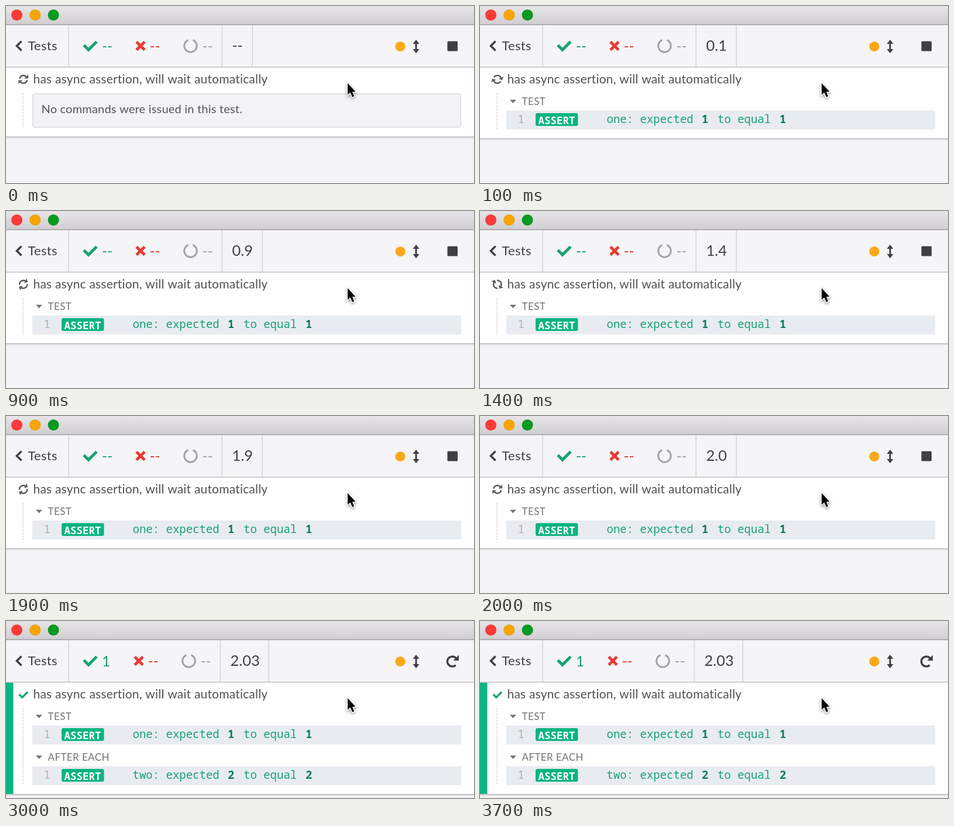
An HTML page with a canvas for the animation above (3.8 s loop, 800 by 304 pixels).

```html
<!DOCTYPE html>
<html lang="en">
<head>
<meta charset="utf-8">
<title>Test runner</title>
<style>
html, body { margin: 0; width: 100%; height: 100%; overflow: hidden; background: #f4f3f5; }
canvas { display: block; }
</style>
</head>
<body>
<canvas id="stage" width="800" height="304"></canvas>
<script>
const ctx = document.getElementById('stage').getContext('2d');
const LOOP = 3800, STEP = 100, DONE = 2100;
const SANS = 'Lato, "Open Sans", sans-serif';
const MONO = '"Noto Sans Mono", "DejaVu Sans Mono", monospace';
const GREEN = '#0bb480', TEAL = '#17a273', RED = '#e53c35', DARK = '#404044', GREY = '#a3a3a6';

function rect(x, y, w, h, color) {
  ctx.fillStyle = color;
  ctx.fillRect(x, y, w, h);
}

function box(x, y, w, h, r, fill, border) {
  ctx.beginPath();
  ctx.roundRect(x, y, w, h, r);
  ctx.fillStyle = fill;
  ctx.fill();
  if (border) {
    ctx.strokeStyle = border;
    ctx.lineWidth = 1.5;
    ctx.stroke();
  }
}

function disc(x, y, r, color) {
  ctx.beginPath();
  ctx.arc(x, y, r, 0, Math.PI * 2);
  ctx.fillStyle = color;
  ctx.fill();
}

function path(points) {
  ctx.beginPath();
  points.forEach(([x, y]) => ctx.lineTo(x, y));
}

function poly(points, color) {
  path(points);
  ctx.closePath();
  ctx.fillStyle = color;
  ctx.fill();
}

function line(points, color, width) {
  path(points);
  ctx.strokeStyle = color;
  ctx.lineWidth = width;
  ctx.stroke();
}

function arc(x, y, r, from, to, color, width) {
  const rad = Math.PI / 180;
  ctx.beginPath();
  ctx.arc(x, y, r, from * rad, to * rad);
  ctx.strokeStyle = color;
  ctx.lineWidth = width;
  ctx.stroke();
}

function text(str, x, y, size, color, spacing = 0, family = SANS, weight = 400) {
  ctx.font = `${weight} ${size}px ${family}`;
  ctx.letterSpacing = spacing + 'px';
  ctx.fillStyle = color;
  ctx.fillText(str, x, y);
}

function check(x, y, s, color) {
  line([[x, y], [x + 8 * s, y + 8 * s], [x + 22 * s, y - 6 * s]], color, 5 * s);
}

function titleBar() {
  const g = ctx.createLinearGradient(0, 0, 0, 32);
  g.addColorStop(0, '#e7e5e7');
  g.addColorStop(1, '#d0ced0');
  rect(0, 0, 800, 32, g);
  rect(0, 31, 800, 2, '#b0aeb0');
  [['#fc3a37', '#e8312f'], ['#f6a503', '#e09604'], ['#089b20', '#078a1c']].forEach(([fill, edge], i) => {
    disc(18.5 + i * 31.3, 15.5, 9.5, edge);
    disc(18.5 + i * 31.3, 15.5, 8.8, fill);
  });
}

function toolbar(done, clock) {
  const shift = done ? -3 : 0;
  rect(0, 33, 800, 71, '#f5f4f6');
  rect(0, 104, 800, 2, '#d0cfd2');
  const end = done ? 449 : clock ? 438 : 421;
  [107, 369 + shift, end].forEach(x => rect(x - 0.5, 33, 1.5, 71, '#d5d4d7'));

  line([[26.5, 60.5], [18.5, 68.5], [26.5, 76.5]], DARK, 3.6);
  text('Tests', 37.5, 76, 22, DARK, 0.3);

  check(133, 67.3, 1, TEAL);
  text(done ? '1' : '--', 164, 77.5, 24.5, TEAL);

  const x = 230 + shift;
  line([[x - 7, 61.5], [x + 7, 75.5]], RED, 5);
  line([[x + 7, 61.5], [x - 7, 75.5]], RED, 5);
  text('--', x + 15.5, 77.5, 24.5, RED);

  arc(315.5 + shift, 68.5, 10.8, -68, 248, GREY, 3);
  text('--', 335.5 + shift, 77.5, 24.5, GREY);

  text(clock || '--', 386.5 + shift, 76.5, clock ? 25.5 : 24.5, DARK);

  disc(674, 69.5, 8.6, '#fba81a');
  line([[701, 63], [701, 76]], DARK, 3);
  poly([[701, 57.7], [706.5, 65], [695.5, 65]], DARK);
  poly([[701, 81.3], [706.5, 74], [695.5, 74]], DARK);

  if (done) {
    arc(763, 69.5, 8.6, 48, 318, DARK, 3.5);
    poly([[774, 58.5], [774, 68], [764.5, 68]], DARK);
  } else {
    box(754.5, 60.5, 17.5, 17, 1.5, DARK);
  }
}

function spinner(t) {
  ctx.save();
  ctx.translate(29.7, 126);
  ctx.rotate(t / 1000 * Math.PI);
  for (let i = 0; i < 2; i++) {
    arc(0, 0, 6.7, 192, 322, '#5c5c60', 2.6);
    poly([[8.4, -8], [8.4, -1.4], [1.8, -1.4]], '#5c5c60');
    ctx.rotate(Math.PI);
  }
  ctx.restore();
}

function group(label, name, n, y) {
  poly([[51, y - 3], [62, y - 3], [56.5, y + 3]], '#77777b');
  text(label, 71.5, y + 6, 17, '#737377', 0.4);
  rect(45, y + 15.5, 733, 32.5, '#e8ecf0');
  const base = y + 37;
  text('1', 64.5, base, 19, '#acb0b5', 0, MONO);
  box(95, y + 20, 72.5, 22, 3, GREEN);
  text('ASSERT', 99.5, base + 1.5, 17.5, '#fff', 0, MONO, 600);
  text(name + ': expected', 216.5, base, 19, TEAL, 0, MONO, 500);
  text(n, 379, base, 19, '#0b7f5a', 0, MONO, 600);
  text('to equal', 406, base, 19, TEAL, 0, MONO, 500);
  text(n, 512, base, 19, '#0b7f5a', 0, MONO, 600);
}

function panel(t, started, done) {
  const end = done ? 282 : started ? 212 : 209;
  const bottom = end + 15;
  rect(0, 106, 800, bottom - 106, '#fefefe');
  rect(0, bottom, 800, 2, '#c6c5c8');
  rect(0, bottom + 2, 800, 2, '#eae9eb');
  if (done) {
    rect(0, 106, 12.5, bottom - 106, GREEN);
    check(22.5, 126, 0.66, TEAL);
  } else {
    spinner(t);
  }
  text('has async assertion, will wait automatically', 46.5, 132.5, 21, '#515155', 0.2);

  for (let y = 150; y < end; y += 4) rect(28.3, y, 1.5, 2, '#cfced2');

  if (!started) {
    box(45.7, 150.7, 731.6, 57.6, 4, '#f3f2f4', '#dcdbde');
    text('No commands were issued in this test.', 60.5, 184, 20, '#545458', 0.2);
    return;
  }
  group('TEST', 'one', '1', 164);
  if (done) group('AFTER EACH', 'two', '2', 234);
}

function cursor() {
  const shape = [[584, 132.5], [584, 152.5], [588.5, 148.5], [592, 156.5], [595.2, 155], [592, 147.5], [597.5, 147]];
  ctx.save();
  ctx.shadowColor = 'rgba(0,0,0,.45)';
  ctx.shadowBlur = 4;
  ctx.shadowOffsetY = 1.5;
  line([...shape, shape[0]], '#fff', 3);
  ctx.restore();
  poly(shape, '#060606');
}

function draw(now) {
  const t = Math.floor(now % LOOP / STEP) * STEP;
  const started = t >= STEP, done = t >= DONE;
  const clock = done ? '2.03' : started ? (t / 1000).toFixed(1) : '';
  rect(0, 0, 800, 304, '#f4f3f5');
  titleBar();
  toolbar(done, clock);
  panel(t, started, done);
  cursor();
}

const start = performance.now();
function tick() {
  draw(performance.now() - start);
  requestAnimationFrame(tick);
}
tick();
</script>
</body>
</html>
```
